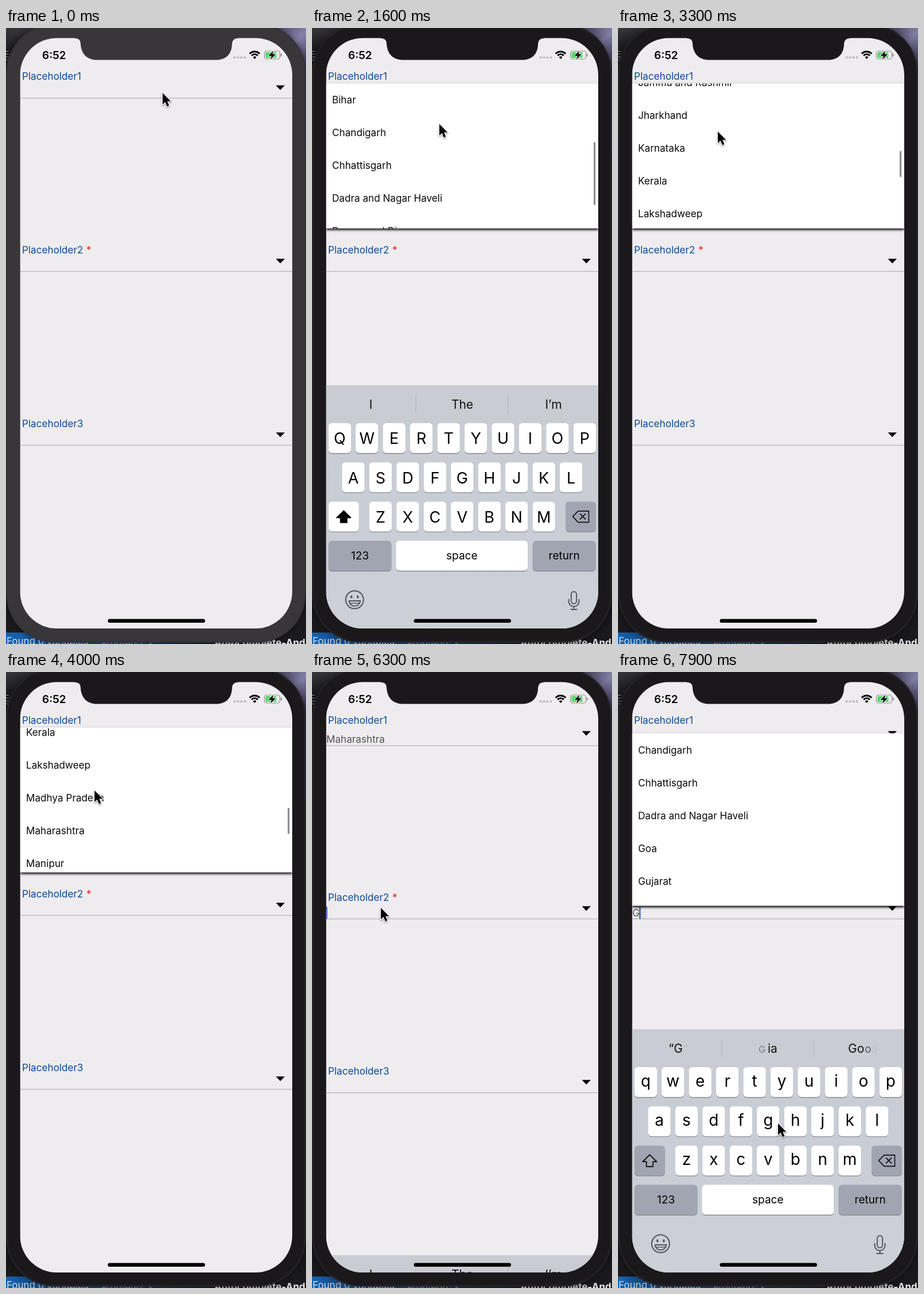
Animation, 523 px wide and 1071 px high, one loop 8 s. Source, as an HTML page with a canvas:

```html
<!DOCTYPE html>
<html lang="en">
<head>
<meta charset="utf-8">
<title>Autocomplete dropdown</title>
<style>
html, body { margin: 0; width: 100%; height: 100%; overflow: hidden; background: #1b1b1f; }
canvas { display: block; width: 100vw; height: 100vh; }
</style>
</head>
<body>
<canvas id="stage"></canvas>
<script>
const W = 523, H = 1071, LOOP = 8000, STEP = 100;
const canvas = document.getElementById('stage');
const g = canvas.getContext('2d');
const dpr = window.devicePixelRatio || 1;
canvas.width = W * dpr;
canvas.height = H * dpr;

const SANS = 'Inter, Roboto, sans-serif';
const BLUE = '#0b4a9b', PAGE = '#eeecee', ICON = '#50545b';
const ROW = 57, BODY = 17.15;
const LEFT = 24.5, WIDTH = 474.5;
const STATES = ['Andaman and Nicobar Islands', 'Andhra Pradesh', 'Arunachal Pradesh', 'Assam',
  'Bihar', 'Chandigarh', 'Chhattisgarh', 'Dadra and Nagar Haveli', 'Daman and Diu', 'Delhi',
  'Goa', 'Gujarat', 'Haryana', 'Himachal Pradesh', 'Jammu and Kashmir', 'Jharkhand',
  'Karnataka', 'Kerala', 'Lakshadweep', 'Madhya Pradesh', 'Maharashtra', 'Manipur',
  'Meghalaya', 'Mizoram', 'Nagaland'];
const FILTERED = STATES.filter(s => /g/i.test(s));

// Event times in ms
const FOCUS = 100, OPEN = 300, HIDE = 1950, PRESS = 4900, PICK = 5200;
const FOCUS2 = 6200, OPEN2 = 6400, TYPED = 7700;

const SCROLL = [[1100, 0], [1300, 95], [1600, 229], [2000, 300], [2400, 318], [2700, 470],
  [3000, 650], [3300, 829], [3600, 925], [4000, 990], [4400, 1005]];
const POINTER = [[0, 273, 113], [700, 273, 113], [1100, 236, 285], [1400, 222, 167],
  [1700, 222, 167], [2200, 192, 290], [2500, 184, 190], [2900, 178, 290], [3300, 174, 180],
  [3700, 174, 180], [4600, 115, 258], [5300, 115, 258], [6100, 120, 410], [6600, 120, 410],
  [7200, 225, 740], [7500, 258, 785], [7600, 258, 785], [7700, 279, 785]];

function track(keys, t, i = 1) {
  if (t <= keys[0][0]) return keys[0][i];
  for (let k = 1; k < keys.length; k++) {
    const a = keys[k - 1], b = keys[k];
    if (t <= b[0]) return a[i] + (b[i] - a[i]) * (t - a[0]) / (b[0] - a[0]);
  }
  return keys[keys.length - 1][i];
}

// Critically damped spring, as used by the system keyboard
function spring(ms) {
  if (ms <= 0) return 0;
  const x = ms * 0.01826;
  return 1 - (1 + x) * Math.exp(-x);
}

function text(s, x, y, size, color = '#000', align = 'left', weight = 400) {
  g.font = `${weight} ${size}px ${SANS}`;
  g.textAlign = align;
  g.fillStyle = color;
  g.fillText(s, x, y);
}

function box(x, y, w, h, r, color) {
  g.beginPath();
  g.roundRect(x, y, w, h, r);
  g.fillStyle = color;
  g.fill();
}

function poly(points, color) {
  g.beginPath();
  points.forEach(([x, y]) => g.lineTo(x, y));
  g.closePath();
  if (color) { g.fillStyle = color; g.fill(); }
}

function line(x1, y1, x2, y2, color, width = 1) {
  g.beginPath();
  g.moveTo(x1, y1);
  g.lineTo(x2, y2);
  g.strokeStyle = color;
  g.lineWidth = width;
  g.stroke();
}

function fade(x0, y0, x1, y1, ...colors) {
  const f = g.createLinearGradient(x0, y0, x1, y1);
  colors.forEach((c, i) => f.addColorStop(i / (colors.length - 1), c));
  return f;
}

function desktop() {
  g.fillStyle = '#1b1b1f';
  g.fillRect(0, 0, W, H);
  g.fillStyle = fade(0, 0, 0, 40, '#37363a', '#1c1c20');
  g.fillRect(0, 0, 60, 40);
  for (let i = 0; i < 4; i++) line(0, 40.5 + i * 5, 5, 40.5 + i * 5, '#aaa');
  g.fillStyle = fade(460, 0, 523, 70, '#46435f', '#8581a8', '#3a3858');
  g.fillRect(460, 0, 63, 222);
  g.fillStyle = fade(0, 0, 360, 0, '#1762ad', '#164a80', '#1a2233');
  g.fillRect(0, 1051, 360, 20);
  text('Found 0 variables', 1, 1072, 17, '#d5dfea');
  text('Frontend: x', 166, 1076, 17, '#8894a5');
  text('Autocomplete-And', 363, 1075, 17, '#e8e8ea', 'left', 700);
}

function phone(color, edge, shade) {
  g.save();
  g.shadowColor = 'rgba(0,0,0,.6)';
  g.shadowBlur = shade;
  box(0.5, -7, 522, 1075.5, 84, edge);
  g.restore();
  box(3, -4, 517, 1069.5, 81, color);
}

function notch(color) {
  g.beginPath();
  g.moveTo(120, 16);
  g.lineTo(120, 18);
  g.quadraticCurveTo(130, 18, 130, 27);
  g.bezierCurveTo(131, 45, 141, 55.5, 159, 55.5);
  g.lineTo(366, 55.5);
  g.bezierCurveTo(384, 55.5, 394, 45, 394, 27);
  g.quadraticCurveTo(395, 18, 404, 18);
  g.lineTo(404, 16);
  g.fillStyle = color;
  g.fill();
}

function statusBar() {
  text('6:52', 63, 53.5, 19, '#000', 'left', 600);
  for (let i = 0; i < 4; i++) box(396.5 + i * 6, 49.3, 4, 4, 2, '#b9b8ba');
  g.strokeStyle = '#000';
  g.lineWidth = 2.8;
  for (const r of [12, 7.4]) {
    g.beginPath();
    g.arc(433.5, 53, r, -Math.PI * 0.76, -Math.PI * 0.24);
    g.stroke();
  }
  g.beginPath();
  g.moveTo(433.5, 54);
  g.arc(433.5, 53.5, 4, -Math.PI * 0.76, -Math.PI * 0.24);
  g.fillStyle = '#000';
  g.fill();
  g.beginPath();
  g.roundRect(450.5, 40, 27, 14, 4);
  g.strokeStyle = '#8f8e90';
  g.lineWidth = 1.2;
  g.stroke();
  box(452.5, 42, 19, 10, 2, '#4cd864');
  box(478.8, 44.5, 2, 5, 1, '#8f8e90');
  const bolt = [[466, 39.5], [457.5, 48.5], [463, 48.5], [461, 55], [470, 45.6], [464.5, 45.6]];
  poly(bolt);
  g.strokeStyle = PAGE;
  g.lineWidth = 2;
  g.stroke();
  poly(bolt, '#000');
}

function field(label, labelY, baseY, arrowY, required) {
  text(label, 28, labelY, BODY, BLUE);
  if (required) text('*', 140, labelY, BODY, '#e0201c');
  line(LEFT, baseY, 499, baseY, '#bdbcc0', 1.6);
  poly([[470.5, arrowY], [486, arrowY], [478.2, arrowY + 8]], '#000');
}

function dropdown(top, height, items, scroll, bar, pressed) {
  g.save();
  g.shadowColor = '#000';
  g.shadowBlur = 4;
  g.shadowOffsetY = 2;
  box(LEFT, top, WIDTH, height, 0, '#fff');
  g.restore();
  g.save();
  g.beginPath();
  g.rect(LEFT, top, WIDTH, height);
  g.clip();
  items.forEach((s, i) => {
    const y = top + 35.3 + i * ROW - scroll;
    if (y > top - 10 && y < top + height + 20)
      text(s, 35, y, BODY, s === pressed ? '#c8c8cb' : '#0a0a0a');
  });
  if (bar) {
    const total = (scroll > 318 ? 30 : 10) * ROW;
    const len = Math.max(45.5, (height - 4) * height / total);
    const y = top + 2 + scroll / (total - height) * (height - 4 - len);
    box(491, y, 3.2, len, 1.6, '#8e8e90');
  }
  g.restore();
}

function key(x, y, w, color = '#fff') {
  box(x, y + 1.4, w, 52, 6, '#888b91');
  box(x, y, w, 52, 6, color);
}

function shiftArrow(y, on) {
  poly([[55.3, y + 16], [67.5, y + 28], [61, y + 28], [61, y + 36.5], [49.6, y + 36.5],
    [49.6, y + 28], [43, y + 28]]);
  g.lineJoin = 'round';
  g.lineWidth = 1.6;
  g.strokeStyle = g.fillStyle = '#000';
  if (on) g.fill();
  g.stroke();
}

function deleteIcon(y) {
  poly([[454.5, y + 26], [464, y + 16.5], [482.5, y + 16.5], [482.5, y + 36], [464, y + 36]]);
  g.lineJoin = 'round';
  g.lineWidth = 1.6;
  g.strokeStyle = '#111';
  g.stroke();
  line(467, y + 21, 477, y + 31, '#111', 1.7);
  line(477, y + 21, 467, y + 31, '#111', 1.7);
}

function smiley(x, y) {
  g.strokeStyle = g.fillStyle = ICON;
  g.lineWidth = 2;
  g.beginPath();
  g.arc(x, y, 15.5, 0, 7);
  g.stroke();
  for (const s of [-1, 1]) {
    g.beginPath();
    g.ellipse(x + s * 5.5, y - 5, 1.8, 2.7, 0, 0, 7);
    g.fill();
  }
  g.beginPath();
  g.moveTo(x - 10, y + 2);
  g.lineTo(x + 10, y + 2);
  g.bezierCurveTo(x + 8, y + 14, x - 8, y + 14, x - 10, y + 2);
  g.stroke();
  line(x - 8, y + 6, x + 8, y + 6, ICON, 1.3);
}

function mic(x, y) {
  g.strokeStyle = ICON;
  g.lineWidth = 1.9;
  g.beginPath();
  g.roundRect(x - 4.7, y - 15, 9.4, 21, 4.7);
  g.stroke();
  g.beginPath();
  g.moveTo(x - 9, y - 2);
  g.lineTo(x - 9, y + 2);
  g.arc(x, y + 2, 9, Math.PI, 0, true);
  g.lineTo(x + 9, y - 2);
  g.stroke();
  line(x, y + 11, x, y + 16, ICON, 1.9);
  line(x - 6, y + 16, x + 6, y + 16, ICON, 1.9);
}

function suggestions(y, typed) {
  const mid = (s, x) => text(s, x, y, 21, '#111', 'center');
  if (!typed) {
    mid('I', 102.5);
    mid('The', 262);
    mid('I’m', 421);
    return;
  }
  text('“G', 88, y, 21, '#111');
  text('”', 114, y, 18, '#b5b8c0');
  text('G', 245, y, 16, '#777b82');
  text('ia', 261, y, 21, '#111');
  text('Go', 401, y, 21, '#111');
  text('o', 430, y, 19, '#555960');
  text('d', 441, y, 18, '#bdc0c8');
}

function keyboard(top, lower, typed) {
  const dark = '#a1a5b1', pitch = 47.45;
  g.fillStyle = fade(0, top, 0, top + 423, '#c9ccd2', '#c9cdd5', '#cdd0d7');
  g.fillRect(LEFT, top, WIDTH, 460);
  line(181, top + 17, 181, top + 49, '#b0b3ba');
  line(341.5, top + 17, 341.5, top + 49, '#b0b3ba');
  suggestions(top + 40.5, typed);
  [['QWERTYUIOP', 28.6], ['ASDFGHJKL', 52.3], ['ZXCVBNM', 99.7]].forEach(([row, x0], r) => {
    const y = top + 66 + r * 68.2;
    [...row].forEach((c, i) => {
      const x = x0 + i * pitch;
      key(x, y, 39.4);
      text(lower ? c.toLowerCase() : c, x + 19.7, y + (lower ? 34 : 36.3), lower ? 28 : 27, '#000', 'center');
    });
  });
  const y3 = top + 202.4, y4 = top + 270.6;
  key(28.8, y3, 53, lower ? dark : '#fff');
  shiftArrow(y3, !lower);
  key(442, y3, 53, dark);
  deleteIcon(y3);
  [['123', 28.8, 109.6, dark], ['space', 146.3, 230, '#fff'], ['return', 384.7, 109.8, dark]]
    .forEach(([s, x, w, c]) => {
      key(x, y4, w, c);
      text(s, x + w / 2, y4 + 32.5, 19, '#000', 'center');
    });
  smiley(74.3, top + 373);
  mic(456.5, top + 374);
}

function cursor(x, y) {
  g.save();
  g.translate(x, y);
  poly([[0, 0], [0, 20], [4.6, 15.8], [7.8, 23.4], [11.4, 21.9], [8.2, 14.4], [14.4, 14.4]]);
  g.shadowColor = 'rgba(0,0,0,.4)';
  g.shadowBlur = 3;
  g.shadowOffsetY = 1.5;
  g.lineJoin = 'round';
  g.lineWidth = 2.4;
  g.strokeStyle = '#fff';
  g.stroke();
  g.shadowColor = 'transparent';
  g.fillStyle = '#000';
  g.fill();
  g.restore();
}

function draw(t) {
  const active = t >= FOCUS, picked = t >= PICK, typed = t >= TYPED;
  const bezel = active ? '#1a181b' : '#39363a';
  g.setTransform(dpr, 0, 0, dpr, 0, 0);
  desktop();
  phone(bezel, active ? '#242326' : '#343236', active ? 24 : 12);

  g.save();
  g.beginPath();
  g.roundRect(LEFT, 17.5, WIDTH, 1026.5, 64);
  g.clip();
  g.fillStyle = PAGE;
  g.fillRect(LEFT, 17, WIDTH, 1028);

  // The first field grows by dy and keeps its arrow centred
  const dy = picked ? 6 : 0;
  field('Placeholder1', 90, 122 + dy, 99.8 + dy / 2);
  field('Placeholder2', 391.7 + dy, 423.3 + dy, 401.2 + dy, true);
  field('Placeholder3', 693.7 + dy, 725.5 + dy, 703.3 + dy);
  if (picked) text('Maharashtra', 25, 122.6, BODY, '#555');
  if (typed) text('G', 25, 424.8, BODY, '#555');
  const caretOn = typed || t < 6800 || t >= 7300;
  if (t >= FOCUS2 && caretOn) box(typed ? 37 : LEFT, 408, 2.4, 21.5, 1, '#3e70cc');

  if (t >= OPEN && !picked) {
    const scrolling = t >= 1200 && t < 4500;
    dropdown(96.5, 252, STATES, track(SCROLL, t), scrolling, t >= PRESS ? 'Maharashtra' : '');
  }
  if (t >= OPEN2) dropdown(106.5, 300, typed ? FILTERED : STATES, 0, false);

  const rise = t < PICK ? spring(t - 255) - spring(t - HIDE) : spring(t - 6276);
  if (rise > 0.002) keyboard(Math.round(1044 - 423 * rise), typed, t >= TYPED + STEP);

  statusBar();
  box(177.5, 1027.5, 169.5, 6.5, 3.2, '#000');
  g.restore();
  notch(bezel);
  cursor(track(POINTER, t, 1), track(POINTER, t, 2));
}

const start = performance.now();
function tick() {
  const t = (performance.now() - start) % LOOP;
  draw(Math.floor(t / STEP) * STEP);
  requestAnimationFrame(tick);
}
tick();
</script>
</body>
</html>
```
